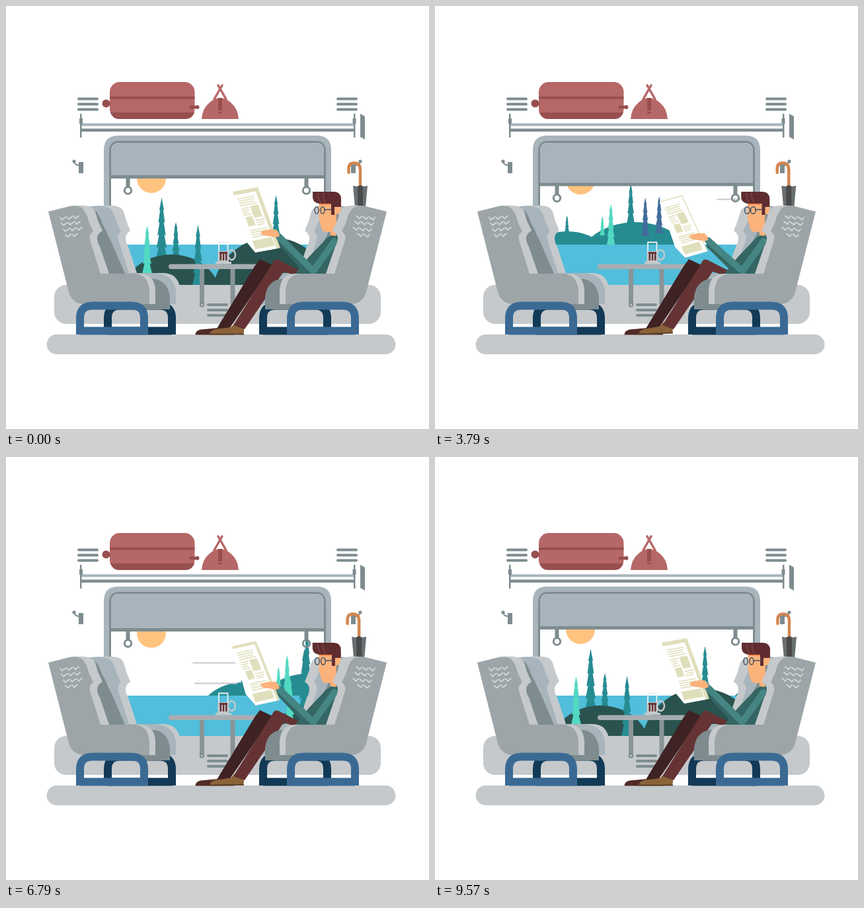
An HTML page for the animation above (9640 ms loop, 640 px wide and 640 px high).

```html
<!DOCTYPE html>
<html lang="en">
<head>
<meta charset="utf-8">
<title>Train ride</title>
<style>
  html, body { margin: 0; width: 100%; height: 100%; overflow: hidden; background: #fff; }
  svg { display: block; width: 100vw; height: 100vh; }
  .line { fill: none; stroke-linecap: round; stroke-linejoin: round; }
  .dark { fill: #7e8c8f; } .darkLine { stroke: #7e8c8f; }
  .steel { fill: #a7b4bc; } .pale { fill: #c5c9cc; } .seat { fill: #9da5a8; }
  .red { fill: #b66767; } .wine { fill: #974f4f; }
  .teal { fill: #268c92; } .forest { fill: #2a534f; }
  .jacket { stroke: #346663; } .sleeve { stroke: #458583; }
  .skin { fill: #fcb27b; } .hair { fill: #5f2d30; }
</style>
</head>
<body>
<svg viewBox="0 0 640 640">
  <defs>
    <clipPath id="pane"><path d="M158 207H482V422H158Z"/></clipPath>
    <g id="vent" class="line darkLine" stroke-width="4"><path d="M0 0H28M0 8H28M0 16H28"/></g>
    <g id="ring">
      <path class="dark" d="M-3-1H3V13H-3Z"/>
      <circle class="darkLine" cy="18" r="5.2" fill="none" stroke-width="3"/>
    </g>
    <g id="hook">
      <path class="dark" d="M110 236H117V253H110Z"/><circle class="dark" cx="103" cy="235" r="2.6"/>
      <path class="line darkLine" stroke-width="2" d="M103 235Q104 241 111 241"/>
    </g>
    <path id="base" class="line" stroke-width="12" style="stroke-linecap:butt"
      d="M112 497V472Q112 453.500 131 453.500H190Q209 453.500 209 472V497M112 491.500H209"/>
    <g id="farSeat">
      <use href="#base" x="42" stroke="#123a57"/>
      <path class="pale" d="M140 303Q152 301 162 302Q175 303 178 311L182 325L188 340Q181 345 181 351Q181 358 185 364L198 404H238Q261 404 264 430V451H150V380Z"/>
      <path class="steel" d="M122 304Q148 299 159 308Q164 314 167 326L174 341Q168 346 170 354L186 404H224Q253 405 257 430V451H150V380Z"/>
      <path class="dark" d="M128 306L137 311Q143 320 145 328L152 341Q154 348 159 356L180 405H140Z"/>
    </g>
    <g id="nearSeat">
      <path class="dark" d="M190 413H224Q245 416 248 440V459H120V440Z"/>
      <path class="pale" d="M96 303Q110 301 119 302Q132 303 135 311L139 325L146 340Q138 345 138 351Q138 358 142 364L156 405H203Q225 406 226 430V451H110Z"/>
      <path class="seat" d="M64 311L96 303Q112 300 118 309Q123 316 125 326L132 341Q125 346 127 354L143 405H194Q215 406 217 430V451H116Q100 449 95 433Z"/>
      <path id="weave" class="line" stroke="#d3d8da" stroke-width="1.800"/>
      <use href="#base" stroke="#3a6a93"/>
    </g>
  </defs>

  <path class="steel" d="M148 425V218Q148 196 170 196H470Q492 196 492 218V425Z"/>
  <path class="darkLine" fill="#fff" stroke-width="3" d="M157.500 425V220Q157.500 205.500 172 205.500H468Q482.500 205.500 482.500 220V425Z"/>
  <g clip-path="url(#pane)">
    <circle id="sun" cx="220" r="22" fill="#ffc37f"/>
    <g id="mid"></g>
    <path fill="#51bedb" d="M158 361H482V422H158Z"/>
    <g id="glint" class="line" stroke="#4cf0f5" stroke-width="3.600">
      <path d="M-22 388H12M-14 392H10M-6 396H16M-20 401H22M-4 398H18"/>
      <path d="M66 367H98M74 371H94M72 375H102M80 379H98M70 382H106"/>
    </g>
    <g id="near"></g>
    <g id="wind" class="line" stroke="#c5c8d0" stroke-width="2"></g>
  </g>
  <path id="shade" class="steel"/>
  <path id="rail" class="dark" d="M158-5H482V0H158Z"/>
  <g id="rings"><use href="#ring" x="184.500"/><use href="#ring" x="454.500"/></g>

  <rect class="pale" x="73" y="422" width="494" height="59" rx="18"/>
  <rect class="pale" x="61.500" y="497" width="528" height="30" rx="15"/>
  <use href="#vent" x="110" y="140.500"/><use href="#vent" x="502" y="140.500"/><use href="#vent" x="306" y="452"/>

  <path class="steel" d="M113 177.500H528V181.500H113Z"/>
  <path class="dark" d="M113 185.500H528V190H113ZM112 163H114.500V199H112ZM111 170H116V178H111ZM526 163H528.500V199H526ZM524.500 170H529.500V178H524.500ZM536 163L543 167V202L536 198Z"/>
  <use href="#hook"/><use href="#hook" transform="matrix(-1 0 0 1 639 0)"/>

  <circle class="wine" cx="151.500" cy="147.500" r="6"/>
  <rect class="red" x="157" y="115" width="128.500" height="56" rx="15"/>
  <path class="wine" d="M157 137H285.500V140.500H157ZM158 161H285Q282 171 270.500 171H172Q161 171 158 161ZM152 145H158V150H152Z"/>
  <path class="line" stroke="#974f4f" stroke-width="4.500" d="M279.500 153H289"/><circle class="wine" cx="289.500" cy="153" r="3"/>
  <path class="line" stroke="#b66767" stroke-width="3.500" d="M315 141L327 120M333 141L321 120"/>
  <path class="red" d="M296 171Q297 155 308 146Q316 139 324 139Q332 139 340 146Q351 155 352 171Z"/>
  <path class="wine" d="M321 139H327V158H321ZM321 160H327V162.500H321Z"/>

  <use href="#farSeat"/><use href="#farSeat" transform="matrix(-1 0 0 1 640 0)"/>

  <path class="line" stroke="#899497" stroke-width="7" style="stroke-linecap:butt" d="M296.500 396V452M343 396V452"/>
  <circle class="dark" cx="296.500" cy="452" r="3.700"/><circle class="pale" cx="296.500" cy="452" r="1.600"/>
  <rect x="246" y="390.500" width="150" height="7.500" rx="3.700" fill="#a7aeb1"/>
  <path class="line" stroke="#edf0f1" stroke-width="1.800" d="M322 372V357.500H335.500V372"/>
  <path class="pale" d="M320.500 371H337V387H341V390.500H317V387H320.500Z"/>
  <path fill="#663535" d="M323 372H335V375H323ZM323.500 374H326V385H323.500ZM327.800 374H330.300V385H327.800ZM332 374H334.500V385H332Z"/>
  <ellipse cx="341.500" cy="376.500" rx="5.500" ry="7.500" fill="none" stroke="#c5c9cc" stroke-width="2.400"/>

  <g id="umbrella">
    <path class="line" stroke="#d28650" stroke-width="4.500" d="M518.500 252V246Q518.500 237.500 527 237.500Q536 237.500 536 248V273"/>
    <path fill="#696e71" d="M525 272L531 273L536 271L541 273L547 272L544 305H528Z"/>
    <path fill="#4b4a4b" d="M532 273L536 271L540 273V305H532Z"/>
  </g>

  <path fill="#3f2223" d="M384 383L412 396L398 400L338 488L319 488L376 394Z"/>
  <path fill="#512b25" d="M286.500 497.500Q287 489 300 489L322 487H345V497.500Z"/>
  <g id="shoe">
    <path fill="#8a6339" d="M308 497Q309 489 322 488.500L340 486L346 480L359 486Q361 491 359 497Z"/>
    <path fill="#5e4028" d="M308 495.500H360V497.500H308Z"/>
  </g>
  <path fill="#653334" d="M455 406L412 384Q406 382 403 389L344 483L361 489L420 402L440 408Z"/>

  <path fill="#346663" d="M498 346Q487 347 480 357L458 380L437 406H504V348Z"/>
  <path id="farArm" class="line jacket" stroke-width="11"/>
  <path class="skin" d="M490 336H500L499 348L491 347Z"/>
  <g id="head">
    <path class="skin" d="M473.500 297H507V315H500V336L496 341Q480 344 478 338L473.500 322Z"/>
    <path fill="#ff8b52" d="M474 298H493V301H474Z"/>
    <path class="hair" d="M464 281H497Q507 282 507 292V304H497V299H474Q465 298 464 290Z"/>
    <path class="line" stroke="#814347" stroke-width="1.500" d="M472 283Q472 292 476 297M480 283Q479 291 483 297"/>
    <g id="glasses">
      <path class="hair" d="M492 297H497V316H492Z"/>
      <g class="line" stroke="#3f5364" stroke-width="1.500">
        <ellipse cx="470" cy="309" ry="5.300"/><ellipse cx="479" cy="309" ry="5.300"/><path d="M482 308H493"/>
      </g>
    </g>
  </g>

  <g id="paper">
    <path fill="#e0dfbc" d="M0 0H100V100H0Z"/>
    <path id="page" fill="#fff"/>
    <path id="print" fill="#e0dfbc"/>
  </g>
  <path id="nearArm" class="line sleeve" stroke-width="10"/>
  <path id="hand" class="skin" d="M386 341L398 338H408Q413 341 414 348L409 350L390 347Q385 346 386 341Z"/>

  <use href="#nearSeat"/><use href="#nearSeat" transform="matrix(-1 0 0 1 640 0)"/>
</svg>
<script>
const $ = id => document.getElementById(id);
const set = (id, attr, value) => $(id).setAttribute(attr, value);
const move = (id, x, y = 0) => set(id, 'transform', `translate(${x} ${y})`);
const smooth = (v, a, b) => {
  const u = Math.min(1, Math.max(0, (v - a) / (b - a)));
  return u * u * (3 - 2 * u);
};

const TEAL = '#268c92', MINT = '#52d9c2', BLUE = '#416d9b';
const WINDOW_Y = 207, NEAR_SPEED = 27, MID_SPEED = 3.79, WIND_SPEED = 48, CYCLE = 67;

// A fir: tiers widening towards the base, mirrored about x.
function tree(x, top, base, half, color) {
  const right = [], tiers = 5;
  for (let i = 1; i <= tiers; i++) {
    const y = top + (base - top) * i / tiers, w = half * (0.25 + 0.75 * i / tiers);
    right.push([w, y]);
    if (i < tiers) right.push([w * 0.62, y - 1]);
  }
  const left = right.map(([w, y]) => [-w, y]).reverse();
  const points = [[0, top], ...right, ...left].map(([w, y]) => `${x + w},${y}`).join(' ');
  return `<polygon points="${points}" fill="${color}"/>`;
}
const hill = (cx, cy, rx, ry, kind) => `<ellipse class="${kind}" cx="${cx}" cy="${cy}" rx="${rx}" ry="${ry}"/>`;

$('mid').innerHTML = tree(256.5, 317, 348, 4, TEAL) + tree(353, 268, 345, 7, TEAL) +
  hill(257, 390, 66, 49, 'teal') + hill(360, 400, 92, 73, 'teal') +
  tree(375, 290, 348, 6, BLUE) + tree(396, 288, 344, 6, BLUE) +
  tree(310, 318, 347, 4, MINT) + tree(323, 300, 362, 6.5, MINT);

$('near').innerHTML = tree(235.5, 290, 385, 9, TEAL) + tree(257, 327, 382, 6.5, TEAL) + tree(408.5, 286, 360, 7, TEAL) +
  hill(250, 440, 75, 64, 'forest') + hill(402, 440, 90, 90, 'forest') +
  tree(213.5, 332, 405, 7.5, MINT) + tree(290.5, 331, 423, 8.5, TEAL);

set('weave', 'd', [[82, 320, 3], [84, 328.5, 3], [87, 337.5, 3], [90, 346, 2]]
  .map(([x, y, n]) => `M${x} ${y}` + 'l3 3.5 5-4m2-.5'.repeat(n)).join(''));

const bar = (x, y, w, h) => `M${x} ${y}h${w}v${h}h${-w}Z`;
const rows = (x, y, w, n, gap = 3.6) => Array.from({ length: n }, (_, i) => bar(x, y + i * gap, w - (i % 3) * 4, 1.7)).join('');
set('print', 'd', rows(8, 12, 68, 4) + rows(8, 28, 32, 4) + bar(45, 27, 32, 19) + bar(12, 43, 27, 15) +
  rows(45, 50, 38, 3) + rows(10, 64, 70, 4) + bar(5, 81, 78, 14));

// Air streaks: row, x at the passing step, passing steps.
const streaks = [
  [311, 187, [21, 39, 57, 75, 93, 111]],
  [342, 253, [21]], [342, 286, [47, 68, 95]],
  [364, 286, [39, 60, 77, 106]],
  [292, 283, [50, 68]], [292, 261, [86, 114]]
];
const nearPasses = [0, 40, 87, 134], glintPasses = [21, 67, 107.75, 155];
const since = (passes, step, span) => step - passes.find(p => step - p < span);

const quadDown = [343, 281, 38, -7, 34, 92], quadUp = [338, 302, 33, -11, 41, 82];

function draw(ms) {
  const step = Math.floor(ms % 9640 * 0.014 + 0.05);
  const phase = step % CYCLE, wave = Math.cos(2 * Math.PI * phase / CYCLE);
  const pose = smooth(phase, 24, 36) - smooth(phase, 48, 62);

  move('mid', MID_SPEED * (step - 68));
  move('near', NEAR_SPEED * since(nearPasses, step, 20));
  move('glint', 268 + NEAR_SPEED * since(glintPasses, step, 14));
  set('sun', 'cy', 264 - 3 * wave);
  $('wind').innerHTML = streaks.map(([y, x, passes]) => passes.map(p =>
    `<path d="M${x + WIND_SPEED * (step - p)} ${y}.5h63"/>`).join('')).join('');

  const shade = 261 + 6.15 * (1 - Math.cos(4 * Math.PI * phase / CYCLE));
  set('shade', 'd', `M159 ${shade - 4}V220Q159 ${WINDOW_Y} 172 ${WINDOW_Y}H468Q481 ${WINDOW_Y} 481 220V${shade - 4}Z`);
  move('rail', 0, shade);
  move('rings', 0, shade);
  move('umbrella', wave - 1);

  const [px, py, ux, uy, vx, vy] = quadDown.map((v, i) => v + (quadUp[i] - v) * pose);
  set('paper', 'transform', `matrix(${[ux / 100, uy / 100, vx / 100, vy / 100, px, py]})`);
  const inset = 1 - pose;
  set('page', 'd', `M0 ${6 * inset}H${100 - 14 * inset}V100H0L-20 79Z`);
  const dy = 8 * pose;
  move('hand', -pose, dy);
  set('farArm', 'd', `M416 ${356 + dy}L452 397M488 357L460 387`);
  set('nearArm', 'd', `M413 ${349 + dy}L465 401L497 356`);

  move('head', -pose);
  move('glasses', pose * 4.5);
  for (const lens of $('glasses').querySelectorAll('ellipse')) lens.setAttribute('rx', 3 + 1.3 * pose);
  set('shoe', 'transform', `rotate(${-3 * pose} 308 496)`);
}

const start = performance.now();
(function tick() {
  draw(performance.now() - start);
  requestAnimationFrame(tick);
})();
</script>
</body>
</html>
```
